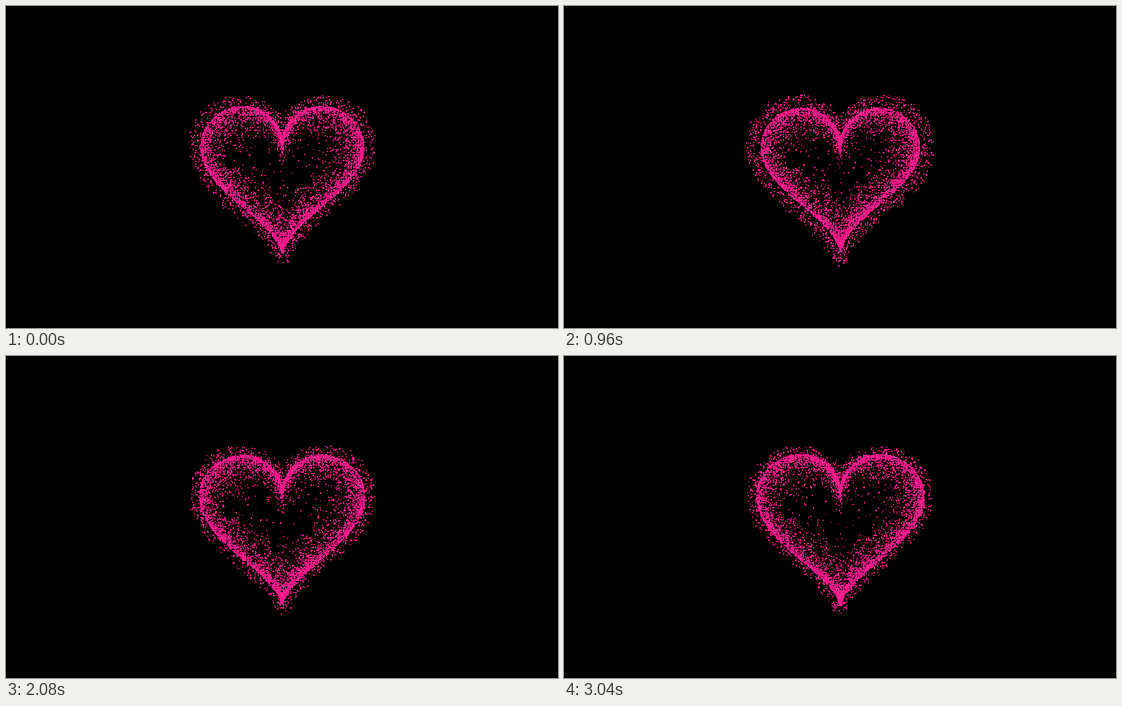
An HTML page with a canvas for the animation above (3200 ms loop, 980 by 572 pixels).

```html
<!DOCTYPE html>
<html lang="en">
<head>
<meta charset="utf-8">
<title>Beating heart</title>
<style>
  html, body { margin: 0; width: 100%; height: 100%; overflow: hidden; background: #000; }
  canvas { display: block; }
</style>
</head>
<body>
<canvas id="stage" width="980" height="572"></canvas>
<script>
const ctx = document.getElementById('stage').getContext('2d');
// The heart lives in a 1200 x 700 space that is scaled down to the stage
const CX = 600, CY = 350, SCALE = 980 / 1200;
const STEP = 160, STEPS = 20;
const { sin, cos, log, floor, ceil, round, PI } = Math;

// Seeded generator (mulberry32)
function generator(seed) {
  return () => {
    seed = (seed + 0x6D2B79F5) | 0;
    let n = Math.imul(seed ^ (seed >>> 15), 1 | seed);
    n = (n + Math.imul(n ^ (n >>> 7), 61 | n)) ^ n;
    return ((n ^ (n >>> 14)) >>> 0) / 4294967296;
  };
}

const between = (rnd, a, b) => a + floor(rnd() * (b - a + 1));

// Distinct whole-pixel points on the heart curve
function outline(rnd, count, size) {
  const points = new Map();
  for (let i = 0; i < count; i++) {
    const t = rnd() * 2 * PI;
    const x = floor(CX + size * 16 * sin(t) ** 3);
    const y = floor(CY - size * (13 * cos(t) - 5 * cos(2 * t) - 2 * cos(3 * t) - cos(4 * t)));
    points.set(x * 1000 + y, [x, y]);
  }
  return [...points.values()];
}

function scatter(rnd, [x, y], beta) {
  const toward = (v, c) => v + beta * log(1 - rnd()) * (v - c);
  return [toward(x, CX), toward(y, CY)];
}

// Moves a point toward the centre, weakening with distance
function pull([x, y], amount, power) {
  const dx = x - CX, dy = y - CY;
  const force = amount / ((dx * dx + dy * dy) ** power || 1);
  return [x - force * dx, y - force * dy];
}

// Paints a square, keeping every stage pixel it covers noticeably
function square(x, y, size) {
  const start = v => floor(v * SCALE + 0.2);
  const end = v => ceil((v + size) * SCALE - 0.2);
  const left = start(x), top = start(y);
  ctx.fillRect(left, top, end(x) - left, end(y) - top);
}

const rnd = generator(2024);
const edge = outline(rnd, 2000, 11);
const inner = edge.flatMap(p => [0, 1, 2].map(() => scatter(rnd, p, 0.05)));
for (let i = 0; i < 4000; i++) {
  inner.push(scatter(rnd, edge[floor(rnd() * edge.length)], 0.17));
}

function draw(step) {
  const rnd = generator(step * 7919 + 1);
  const beat = 2 / PI * sin(0.4 * PI * step);
  const haloRadius = floor(10 + 6 * beat + 1e-9);
  const haloCount = floor(3000 + 4000 * beat * beat);

  ctx.fillStyle = '#000';
  ctx.fillRect(0, 0, 980, 572);
  ctx.fillStyle = '#ff1a8c';

  const dot = ([x, y], jitter, size) => square(
    round(x + between(rnd, -jitter, jitter)),
    round(y + between(rnd, -jitter, jitter)), size);

  for (const p of outline(rnd, haloCount, 11.6)) {
    dot(pull(p, -haloRadius, 0.6), 14, rnd() < 1 / 3 ? 1 : 2);
  }
  for (const p of edge) dot(pull(p, 10 * beat, 0.52), 1, between(rnd, 1, 3));
  for (const p of inner) dot(pull(p, 10 * beat, 0.52), 1, between(rnd, 1, 2));
}

let shown = -1;
function tick() {
  const step = floor(performance.now() / STEP) % STEPS;
  if (step !== shown) draw(shown = step);
  requestAnimationFrame(tick);
}
tick();
</script>
</body>
</html>
```
